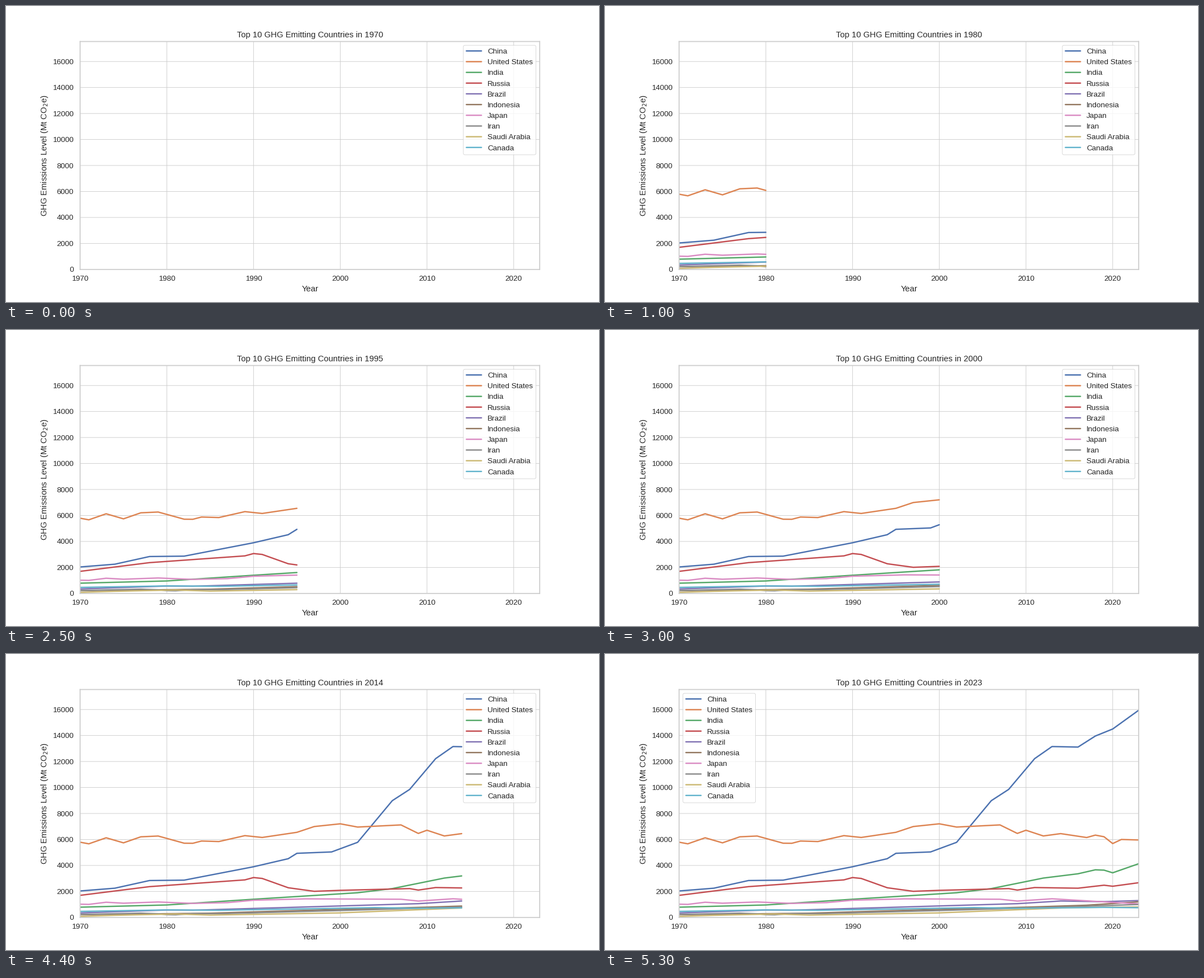
A matplotlib script that plays this animation: 1058 by 529 pixels, repeating every 5400 ms.

```python
import matplotlib.pyplot as plt
import numpy as np
from matplotlib.animation import FuncAnimation

YEARS = np.arange(1970, 2024)
LEGEND_MOVES = 2015  # from here on the top line would run under the legend

plt.rcParams.update({
    "font.family": "Liberation Sans", "path.snap": False,
    "text.color": "0.15", "axes.labelcolor": "0.15",
    "xtick.color": "0.15", "ytick.color": "0.15",
    "axes.edgecolor": "0.8", "axes.linewidth": 1.44, "axes.axisbelow": True,
    "axes.grid": True, "grid.color": "0.8", "grid.linewidth": 0.75,
    "axes.titlesize": 12, "axes.labelsize": 12,
    "xtick.labelsize": 11, "ytick.labelsize": 11, "legend.fontsize": 11,
    "xtick.bottom": False, "ytick.left": False,
    "xtick.major.size": 6, "ytick.major.size": 6,
    "lines.linewidth": 2, "lines.solid_capstyle": "round",
})

fig, ax = plt.subplots(figsize=(12, 6), dpi=529 / 6)
tracks = []


def country(name, color, *turns):
    """Add a line that runs straight between its (year, level) turning points."""
    line, = ax.plot([], [], color=color, label=name)
    tracks.append((line, np.interp(YEARS, *zip(*turns))))


country("China", "#4C72B0",
        (1970, 2037), (1974, 2250), (1978, 2840), (1982, 2870), (1990, 3900),
        (1994, 4520), (1995, 4935), (1999, 5040), (2002, 5780), (2006, 8985),
        (2008, 9850), (2011, 12220), (2013, 13150), (2016, 13110),
        (2018, 13960), (2020, 14500), (2023, 15944))
country("United States", "#DD8452",
        (1970, 5790), (1971, 5665), (1973, 6130), (1975, 5740), (1977, 6205),
        (1979, 6265), (1982.5, 5620), (1984, 5880), (1986, 5840),
        (1989, 6295), (1991, 6155), (1995, 6550), (1997, 6995), (2000, 7205),
        (2002, 6955), (2007, 7120), (2009, 6465), (2010, 6710), (2012, 6270),
        (2014, 6450), (2017, 6150), (2018, 6335), (2019, 6210), (2020, 5685),
        (2021, 6000), (2023, 5961))
country("India", "#55A868",
        (1970, 790), (1980, 960), (1990, 1400), (2002, 1900), (2006, 2220),
        (2012, 3030), (2016, 3360), (2018, 3665), (2019, 3640), (2020, 3435),
        (2023, 4134))
country("Russia", "#C44E52",
        (1970, 1700), (1978, 2370), (1989, 2890), (1990, 3070), (1991, 3000),
        (1994, 2285), (1997, 2010), (2000, 2085), (2008, 2220), (2009, 2105),
        (2011, 2300), (2016, 2250), (2019, 2480), (2020, 2400), (2023, 2672))
country("Brazil", "#8172B3",
        (1970, 345), (1980, 570), (1983, 555), (2009, 1060), (2014, 1265),
        (2019, 1215), (2023, 1300))
country("Indonesia", "#937860",
        (1970, 215), (1985, 325), (1997, 565), (2010, 790), (2017, 940),
        (2023, 1200))
country("Japan", "#DA8BC3",
        (1970, 1020), (1971, 1005), (1973, 1170), (1975, 1095), (1979, 1190),
        (1983, 1080), (1987, 1140), (1990, 1325), (1996, 1430), (2007, 1400),
        (2009, 1260), (2013, 1435), (2023, 1041))
country("Iran", "#8C8C8C",
        (1970, 225), (1977, 330), (1979, 285), (1980.5, 180), (1983, 295),
        (1986, 285), (2000, 530), (2015, 820), (2023, 997))
country("Saudi Arabia", "#CCB974",
        (1970, 80), (1974, 165), (1981, 265), (1985, 180), (2000, 350),
        (2015, 755), (2023, 805))
country("Canada", "#64B5CD",
        (1970, 465), (1980, 580), (1986, 550), (2004, 755), (2009, 705),
        (2019, 775), (2023, 748))

peak = max(levels.max() for _, levels in tracks)
ax.set(xlim=(YEARS[0], YEARS[-1]), ylim=(0, 1.1 * peak),
       xlabel="Year", ylabel="GHG Emissions Level (Mt CO$_2$e)")
title = ax.set_title("")
legend = ax.legend(loc="upper right")
legend.get_frame().set_linewidth(0.75)


def update(frame):
    year = YEARS[frame]
    for line, levels in tracks:
        line.set_data(YEARS[:frame + 1], levels[:frame + 1])
    title.set_text(f"Top 10 GHG Emitting Countries in {year}")
    legend.set_loc("upper right" if year < LEGEND_MOVES else "upper left")
    return [line for line, _ in tracks] + [title, legend]


animation = FuncAnimation(fig, update, frames=len(YEARS), interval=100,
                          repeat=True, repeat_delay=0)
plt.show()
```
